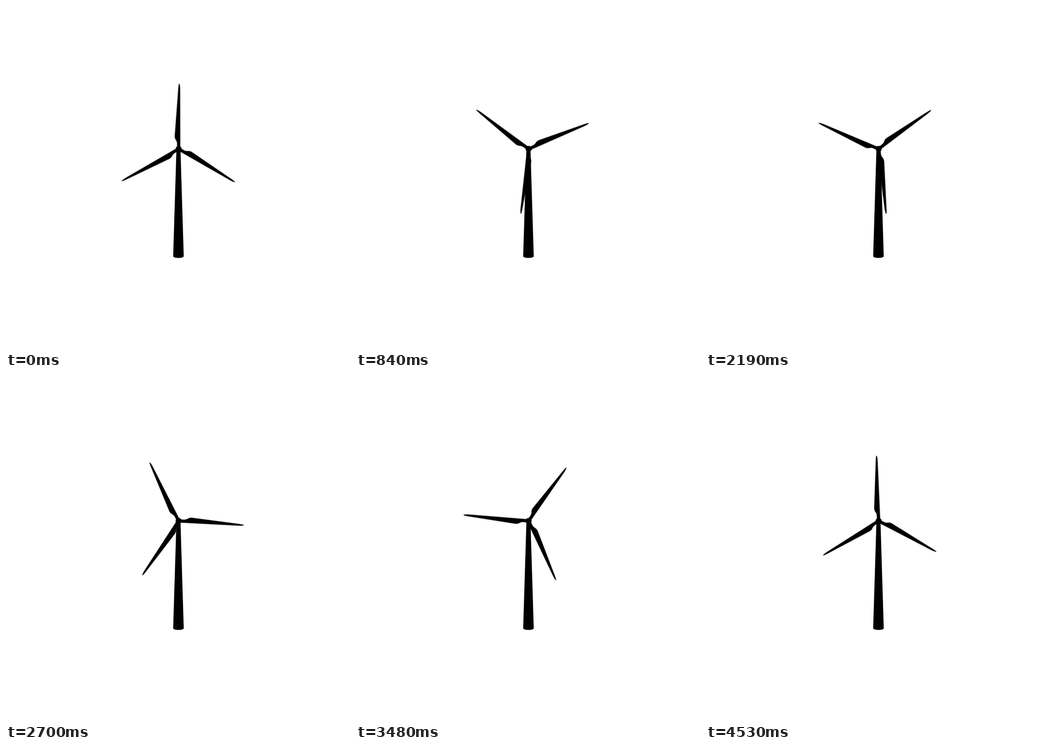
An HTML page for the animation above (4.56 s loop, 748 by 749 pixels).

```html
<!DOCTYPE html>
<html lang="en">
<head>
<meta charset="utf-8">
<title>Wind turbine</title>
<style>
  html, body { margin: 0; width: 100%; height: 100%; overflow: hidden; background: #fff; }
  svg { display: block; width: 100%; height: 100%; }
  #rotor { transform-origin: 0 0; }
</style>
</head>
<body>
<svg viewBox="0 0 748 749">
  <defs>
    <!-- One blade pointing up, hub centre at the origin -->
    <path id="blade" d="M1.2-142.3C2.5-142.3 3.2-136 3.3-130L3.6-4H-3.5V-12C-3.6-19-8.6-20-8.6-27.5L-8.4-31L-1-130C-.5-136 .1-142.3 1.2-142.3Z"/>
  </defs>
  <path d="M370.6 313H379.4L386.5 544.5C386.5 547 381.5 548.6 375 548.6S363.5 547 363.5 544.5Z"/>
  <g transform="translate(375.4 311.2)">
    <g id="rotor">
      <circle r="6.6"/>
      <use href="#blade"/>
      <use href="#blade" transform="rotate(120)"/>
      <use href="#blade" transform="rotate(240)"/>
    </g>
  </g>
</svg>
<script>
  const LOOP = 4560, STEP = 30;
  document.getElementById('rotor').animate(
    { transform: ['rotate(0deg)', 'rotate(360deg)'] },
    { duration: LOOP, iterations: Infinity, easing: `steps(${LOOP / STEP}, end)` }
  );
</script>
</body>
</html>
```
